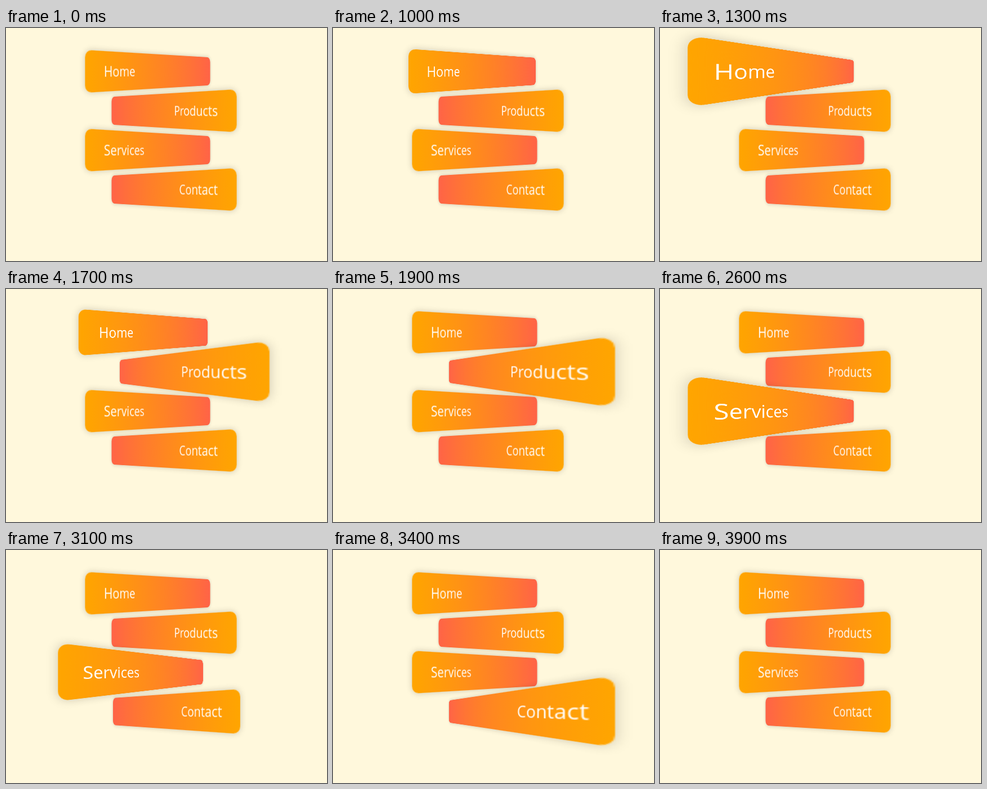
An HTML page that plays this animation: 570 px wide and 414 px high, repeating every 5500 ms.

```html
<!DOCTYPE html>
<html lang="en">
<head>
<meta charset="utf-8">
<title>Perspective menu</title>
<style>
  html, body {
    margin: 0;
    width: 100%;
    height: 100%;
    overflow: hidden;
    background: cornsilk;
  }
  ul {
    position: absolute;
    left: 125px;
    top: 47px;
    margin: 0;
    padding: 0;
    list-style: none;
  }
  li {
    --turn: 45deg;
    --d: 500px;
    --pad: 31px;
    box-sizing: border-box;
    width: 300px;
    height: 60px;
    margin-bottom: 10px;
    padding: 0 var(--pad);
    border-radius: 10px;
    background: linear-gradient(to right, orange, tomato);
    box-shadow: 0 0 10px rgba(0, 0, 0, .2);
    color: white;
    font: 21.1px/60px "Open Sans", "Noto Sans", sans-serif;
    white-space: nowrap;
    transform: perspective(var(--d)) rotateY(var(--turn));
  }
  li:nth-child(even) {
    --turn: -45deg;
    background: linear-gradient(to left, orange, tomato);
    text-align: right;
  }
</style>
</head>
<body>
<ul>
  <li>Home</li>
  <li>Products</li>
  <li>Services</li>
  <li>Contact</li>
</ul>
<script>
  const LOOP = 5500, STEP = 100, EASE_MS = 300, TEXT_LEAD = 20;
  const NEAR = 1 / 200, FAR = 1 / 500;

  // Each hover: [first visible step, ms already eased by then]
  const hovers = [
    { enter: [1000, 33], leave: [1600, 50] },
    { enter: [1600, 35], leave: [2400, 117] },
    { enter: [2400, 84], leave: [3100, 67] },
    { enter: [3100, 33], leave: [3700, 100] }
  ];
  const items = [...document.querySelectorAll('li')];

  const bezier = (a, b, u) =>
    3 * a * u * (1 - u) ** 2 + 3 * b * u * u * (1 - u) + u ** 3;

  // CSS "ease": cubic-bezier(.25, .1, .25, 1)
  function ease(x) {
    if (x <= 0) return 0;
    if (x >= 1) return 1;
    let lo = 0, hi = 1;
    for (let i = 0; i < 24; i++) {
      const mid = (lo + hi) / 2;
      if (bezier(.25, .25, mid) < x) lo = mid; else hi = mid;
    }
    return bezier(.1, 1, lo);
  }

  const progress = (t, [start, done], lead) =>
    t < start ? 0 : ease((t - start + done + lead) / EASE_MS);

  const amount = (t, hover, lead = 0) =>
    progress(t, hover.enter, lead) - progress(t, hover.leave, lead);

  function draw(t) {
    items.forEach((item, i) => {
      const depth = FAR + (NEAR - FAR) * amount(t, hovers[i]);
      const pad = 31 - 15 * amount(t, hovers[i], TEXT_LEAD);
      item.style.setProperty('--d', 1 / depth + 'px');
      item.style.setProperty('--pad', pad + 'px');
    });
  }

  const begin = performance.now();
  let shown = -1;
  function tick() {
    const t = (performance.now() - begin) % LOOP;
    const step = Math.floor(t / STEP) * STEP;
    if (step !== shown) draw(shown = step);
    requestAnimationFrame(tick);
  }
  tick();
</script>
</body>
</html>
```
